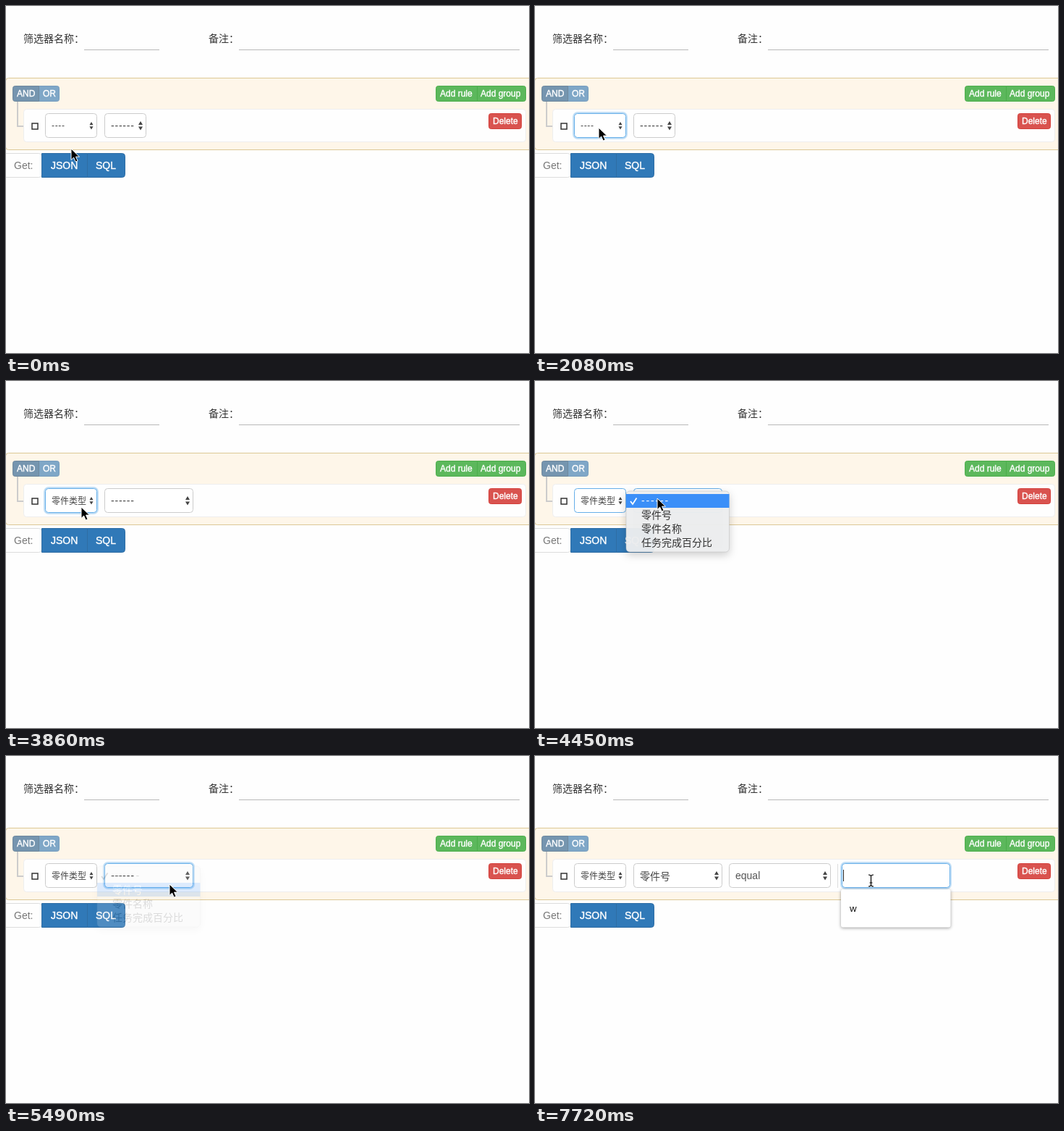
An HTML page that plays this animation: 723 by 479 pixels, repeating every 8 s.

```html
<!DOCTYPE html>
<html lang="zh-CN">
<head>
<meta charset="utf-8">
<style>
  html, body { margin: 0; width: 100%; height: 100%; overflow: hidden; background: #fefefe; }
  svg { display: block; }
  text { font-family: "Liberation Sans", "Noto Sans CJK SC", "Noto Sans CJK", sans-serif; white-space: pre; }
  .menu { filter: drop-shadow(0 4px 6px rgba(0, 0, 0, .2)); }
  .popup { filter: drop-shadow(0 1px 2px rgba(0, 0, 0, .4)); }
</style>
</head>
<body>
<svg width="723" height="479" viewBox="0 0 723 479"><g id="base"></g><g id="live"></g></svg>
<script>
const LOOP = 8000;

const box = (x, y, w, h, fill, stroke = 'none', r = 4) =>
  `<rect x="${x + .5}" y="${y + .5}" width="${w - 1}" height="${h - 1}" rx="${r}" fill="${fill}" stroke="${stroke}"/>`;
const bar = (x, y, w, h, fill) => `<rect x="${x}" y="${y}" width="${w}" height="${h}" fill="${fill}"/>`;
const text = (x, y, str, size = 14, fill = '#333', extra = '') =>
  `<text x="${x}" y="${y}" font-size="${size}" fill="${fill}" ${extra}>${str}</text>`;
const path = (d, attrs) => `<path d="${d}" ${attrs}/>`;
const bold = (x, y, str, size, fill = '#fff') => text(x, y, str, size, fill, `stroke="${fill}" stroke-width=".4"`);
const dashes = (x, y, n, size, step, fill = '#444') =>
  text(x, y, '-'.repeat(n), size, fill, `letter-spacing="${step - size * .333}"`);

// Button with rounding on the left, right or both ends
function button(x, y, w, h, label, tx, size, fill, edge, ends = 'lr', r = 3) {
  const l = ends.includes('l') ? r : 0, q = ends.includes('r') ? r : 0;
  const d = `M${x + .5 + l} ${y + .5}h${w - 1 - l - q}q${q} 0 ${q} ${q}v${h - 1 - 2 * q}q0 ${q} ${-q} ${q}` +
    `h${-(w - 1 - l - q)}q${-l} 0 ${-l} ${-l}v${-(h - 1 - 2 * l)}q0 ${-l} ${l} ${-l}z`;
  return path(d, `fill="${fill}" stroke="${edge}"`) + bold(tx, y + (size > 12 ? 22 : 15), label, size);
}

// Focus: 0 none, 1 blue edge only, 2 edge and glow
function field(x, w, focus = 0) {
  const glow = focus > 1
    ? `<rect x="${x}" y="148" width="${w}" height="34" rx="5" fill="none" stroke="#66afe9" stroke-width="4" opacity=".4"/>` : '';
  return glow + box(x, 148, w, 34, '#fff', focus ? '#66afe9' : '#ccc');
}

function select(x, w, label, focus, s = 1) {
  const cx = x + w - 8;
  const arrows = path(`M${cx - 3 * s} ${165 - s}h${6 * s}l${-3 * s} ${-5 * s}zM${cx - 3 * s} ${165 + 1.5 * s}h${6 * s}l${-3 * s} ${5 * s}z`, 'fill="#444"');
  return field(x, w, focus) + label + arrows;
}

function menu(x, y, w, rows, rowH, size, dashStep, active, opacity) {
  let out = `<g opacity="${opacity}"><g class="menu">` +
    `<rect x="${x}" y="${y}" width="${w}" height="${rowH * rows.length + 8}" rx="5" fill="#eeeff0" fill-opacity=".96" stroke="#bbb" stroke-width=".5"/></g>`;
  out += bar(x, y + 4 + active * rowH, w, rowH, '#3b8ff8');
  rows.forEach((row, i) => {
    const fill = i === active ? '#fff' : '#333', mid = y + 4 + (i + .5) * rowH;
    out += typeof row === 'number'
      ? dashes(x + 21, mid + size * .3, row, size, dashStep, fill) +
        path(`M${x + 6} ${mid + .5}l3 4l5.5 -8.5`, `fill="none" stroke="${fill}" stroke-width="1.7"`)
      : text(x + 21, mid + size * .37, row, size, fill);
  });
  return out + '</g>';
}

const arrow = (x, y) => path(`M${x} ${y}v15.5l3.6 -3.4l2.6 5.9l2.9 -1.2l-2.6 -5.7h5z`,
  'fill="#000" stroke="#fff" stroke-width="1"');

function beam(x, y) {
  const d = `M${x - 3.5} ${y - 8}q3.5 0 3.5 2.5v11q0 2.5 -3.5 2.5M${x + 3.5} ${y - 8}q-3.5 0 -3.5 2.5v11q0 2.5 3.5 2.5M${x - 2} ${y + 3}h4`;
  return path(d, 'fill="none" stroke="#fff" stroke-width="2.5"') + path(d, 'fill="none" stroke="#000" stroke-width="1.2"');
}

document.getElementById('base').innerHTML =
  text(24, 50, '筛选器名称：') + bar(108, 60, 104, 1, '#b8b8b8') +
  text(280, 50, '备注：') + bar(322, 60, 388, 1, '#b8b8b8') +
  box(-1, 99, 730, 100, '#fef6e9', '#dcc896') +
  path('M16 132v34h8', 'fill="none" stroke="#ccc" stroke-width="2"') +
  button(45, 110, 29, 22, 'OR', 51, 12, '#7fa7c7', '#769dbe', 'r') +
  button(9, 110, 37, 22, 'AND', 15, 12, '#7595af', '#6e889d', 'l') +
  button(594, 110, 58, 22, 'Add rule', 600, 12, '#5cb85c', '#4cae4c', 'l') +
  button(651, 110, 68, 22, 'Add group', 656, 12, '#5cb85c', '#4cae4c', 'r') +
  box(24, 142, 695, 46, '#fefefe', '#eee') +
  '<rect x="36" y="162" width="8" height="8" fill="none" stroke="#333" stroke-width="1.5"/>' +
  button(667, 148, 46, 22, 'Delete', 673, 12, '#d9534f', '#d43f3a') +
  box(-5, 203, 55, 34, '#fefefe', '#ddd') + text(11, 225, 'Get:', 14, '#777') +
  button(112, 203, 53, 34, 'SQL', 124, 14, '#3079b8', '#2e6da4', 'r', 4) +
  button(49, 203, 64, 34, 'JSON', 62, 14, '#3079b8', '#2e6da4', '', 4);

// Pointer stops: time, x, y
const stops = [
  [0, 90, 197], [150, 90, 201], [450, 90, 200], [600, 89, 192], [740, 88, 180], [890, 88, 172], [1030, 88, 168],
  [3120, 90, 175], [3270, 90, 177], [3860, 104, 174], [4000, 140, 167], [4150, 165, 163],
  [4450, 169, 162], [4600, 171, 167], [4750, 185, 174], [4900, 210, 178], [5050, 226, 177],
  [5640, 258, 178], [5790, 317, 174], [6090, 388, 174], [6240, 436.5, 176], [6380, 455, 174], [6530, 464.5, 172]
];

function scene(t) {
  const on = (from, to = LOOP) => t >= from && t < to;
  const typed = on(3860), ruled = on(5640);
  const [, px, py] = stops.filter(s => s[0] <= t).pop();

  let out = select(54, 72, typed ? text(63, 169.5, '零件类型', 12, '#444') : dashes(63, 169, 4, 12, 4.67),
    on(2080, 4450) ? 2 : on(4450, 4600) ? 1 : 0, .85);
  out += select(136, typed ? 123 : 58, ruled ? text(145, 170.5, '零件号', 14, '#444') : dashes(145, 170, 6, 14, 5.45),
    on(4450, 4600) ? 1 : on(4600, 5640) ? 2 : on(5640, 5790) ? 1 : 0);

  if (ruled) {
    out += select(268, 141, text(277, 170, 'equal', 14, '#555'), 0) + bar(418, 149, 1, 33, '#ddd');
    out += field(424, 150, on(6820) ? 2 : 0);
  }
  if (on(6820)) {
    out += '<rect class="popup" x="423" y="184" width="151.5" height="52.5" rx="3" fill="#fff"/>' + text(435, 215, 'w', 13.3, '#111');
    if (!on(7270, 7720)) out += bar(426, 157, 1, 16, '#222');
  }
  if (on(2520, 3860))
    out += menu(44, 152, 92, [4, '零件类型', '工作项'], 17, 12, 5.5, on(3120) ? 1 : 0, on(3710) ? .17 : 1);
  if (on(4450, 5640))
    out += menu(126, 152, 142.5, [6, '零件号', '零件名称', '任务完成百分比'], 19, 14, 6.5, on(4900) ? 1 : 0, on(5490) ? .17 : 1);

  return out + (on(6240) ? beam(px, py) : arrow(px, py));
}

const live = document.getElementById('live');
let start, shown;
function tick(now) {
  start ??= now;
  const next = scene((now - start) % LOOP);
  if (next !== shown) live.innerHTML = shown = next;
  requestAnimationFrame(tick);
}
requestAnimationFrame(tick);
</script>
</body>
</html>
```
